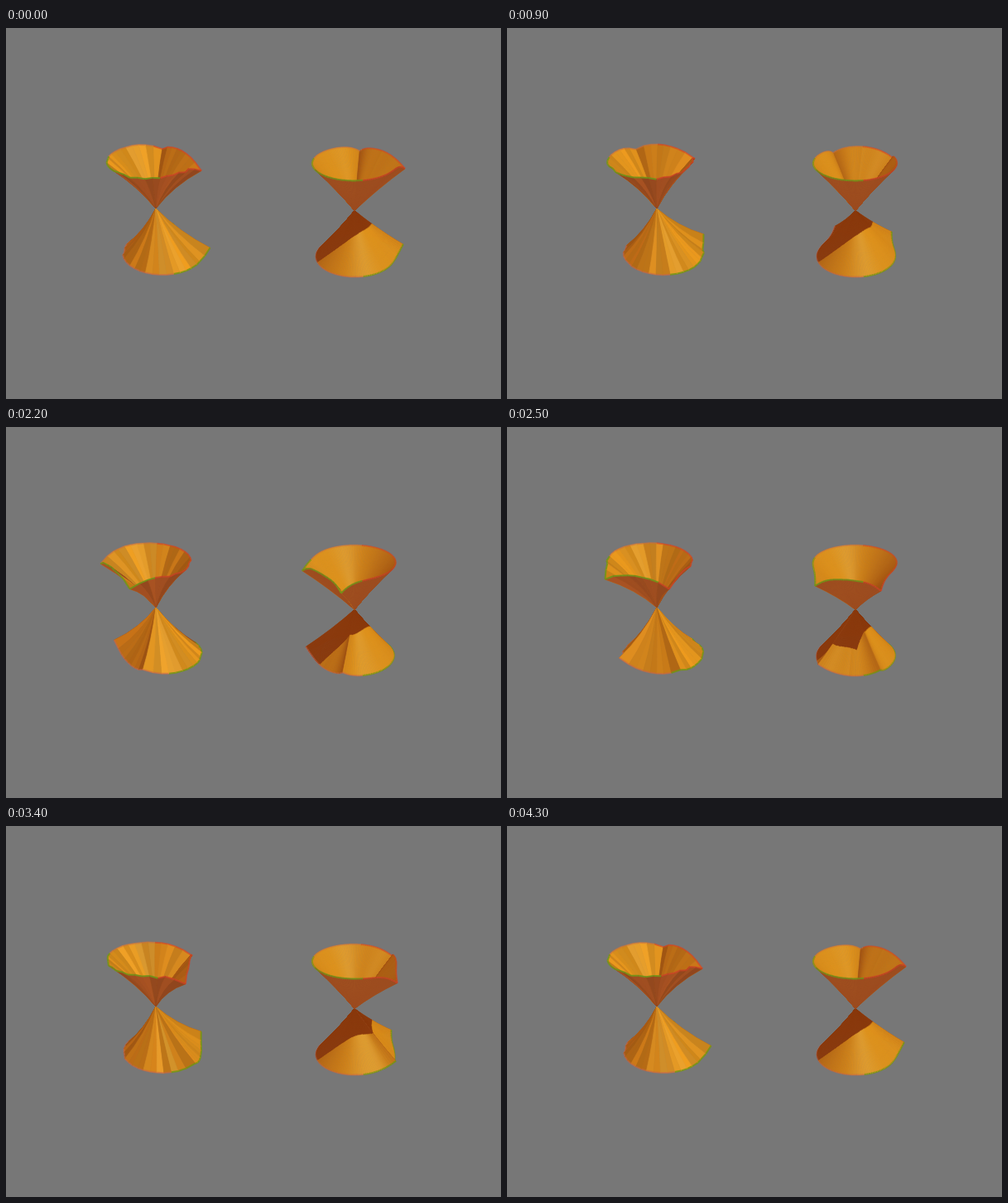
An HTML page with a canvas for the animation above (4.4 s loop, 598 px wide and 448 px high).

```html
<!DOCTYPE html>
<html lang="en">
<head>
<meta charset="utf-8">
<title>Rotating double cones</title>
<style>
  html, body { margin: 0; width: 100%; height: 100%; overflow: hidden; background: #777; }
  canvas { display: block; }
</style>
</head>
<body>
<canvas id="stage" width="598" height="448"></canvas>
<script>
const ctx = document.getElementById('stage').getContext('2d');
const TAU = Math.PI * 2, RAD = Math.PI / 180;
const STEP = 100, STEPS = 44;
const TILT = 28 * RAD, CAMERA = 900;

const dot = (a, b) => a[0] * b[0] + a[1] * b[1] + a[2] * b[2];
const scale = (a, k) => a.map(v => v * k);
const unit = a => scale(a, 1 / (Math.hypot(...a) || 1));
const cross = (a, b) => [
  a[1] * b[2] - a[2] * b[1], a[2] * b[0] - a[0] * b[2], a[0] * b[1] - a[1] * b[0]];

// x points right, y away from the viewer, z up
const light = unit([0.3, -0.25, 1]);
const view = [0, -Math.cos(TILT), Math.sin(TILT)];
const half = unit(light.map((v, i) => v + view[i]));

function seeded(seed) {
  return () => {
    seed = (seed * 16807) % 2147483647;
    return seed / 2147483647;
  };
}

function makeCone(spec) {
  const random = seeded(spec.seed);
  const jitter = Array.from({ length: spec.sides }, () => random() * 2 - 1);
  return { ...spec, jitter };
}

const cones = [
  makeCone({ x: 181, y: 218, radius: 80, sides: 36, tip: 40, turn: -10,
    lean: 0.13, flare: 0.22, rough: 1, seed: 77 }),
  makeCone({ x: 421, y: 220.5, radius: 80, sides: 180, tip: 38, turn: 0,
    lean: 0.01, flare: 0.08, rough: 0, seed: 5 })
];

// Opening angle of the cone: round, with two sharp outward ridges
function opening(cone, angle) {
  const a = Math.abs(Math.atan2(Math.sin(angle), Math.cos(angle))) / RAD;
  return (37.5 + 12 * Math.exp(-Math.abs(a - cone.tip) / 11)) * RAD;
}

function heading(u) {
  return 38.5 + 360 * u - 38 * Math.sin(TAU * u) + 7 * Math.cos(TAU * u);
}

function project(cone, p) {
  const k = cone.radius / (1 - dot(p, view) * cone.radius / CAMERA);
  return [
    cone.x + (p[0] - p[2] * cone.lean) * k,
    cone.y - (p[2] * Math.cos(TILT) + p[1] * Math.sin(TILT)) * k
  ];
}

// Point at distance s along a ruling that flares towards the rim
function along(cone, line, s) {
  const phi = line.phi * (1 - cone.flare * (1 - s));
  const r = s * Math.sin(phi);
  return [r * Math.cos(line.angle), r * Math.sin(line.angle), s * Math.cos(phi) * line.side];
}

// Both edges of a strip between two rulings, as one outline
function strip(cone, p, q, ends) {
  const cuts = [0, 0.25, 0.5, 0.75, 1];
  const edge = (line, [from, to]) => cuts.map(c => along(cone, line, from + (to - from) * c));
  return [...edge(p, ends(p)), ...edge(q, ends(q)).reverse()];
}

// How far down a lower ruling the shadow of the upper cone reaches
function shadowReach(cone, dir, turn) {
  const b = dot(dir, light);
  for (let s = 1; s > 0; s -= 0.006) {
    const t = -b * s + Math.sqrt(b * b * s * s + 1 - s * s);
    const q = dir.map((v, i) => v * s + light[i] * t);
    if (q[2] > 0 && Math.acos(Math.min(1, q[2])) < opening(cone, Math.atan2(q[1], q[0]) - turn)) return s;
  }
  return 0;
}

function shade(normal, shadowed, grain) {
  const diffuse = shadowed ? 0 : Math.max(0, dot(normal, light));
  const gloss = shadowed ? 0 : Math.max(0, dot(normal, half)) ** 30;
  const bounce = normal[2] < 0 ? 18 : 0;
  const mix = (dark, lit, shine) => Math.round(
    (dark + bounce + (lit - dark) * diffuse + shine * gloss) * (1 + grain));
  return `rgb(${mix(138, 236, 12)},${mix(58, 160, 32)},${mix(14, 30, 44)})`;
}

function rulings(cone, turn, side) {
  return cone.jitter.map((j, i) => {
    const a = i * TAU / cone.sides;
    const line = {
      phi: opening(cone, a) + cone.rough * j * RAD,
      angle: a + turn,
      side
    };
    line.dir = along(cone, line, 1);
    line.reach = side < 0 && !cone.rough ? shadowReach(cone, line.dir, turn) : 0;
    return line;
  });
}

function rimTint(p, side) {
  const right = p[0] > 0.12;
  if (side < 0) return right ? 'rgba(110,150,20,.8)' : 'rgba(200,100,80,.5)';
  if (right) return 'rgba(215,65,40,.6)';
  return p[1] < 0.15 ? 'rgba(110,150,25,.85)' : 'rgba(200,110,70,.5)';
}

function addFaces(cone, turn, side, faces) {
  const lines = rulings(cone, turn, side);
  lines.forEach((p, i) => {
    const q = lines[(i + 1) % lines.length];
    let normal = unit(cross(p.dir, q.dir));
    if (dot(normal, view) < 0) normal = scale(normal, -1);
    const middle = p.dir.map((v, k) => (v + q.dir[k]) / 2);
    const depth = dot(middle, view);
    const grain = cone.rough * cone.jitter[(i * 7 + 3) % cone.sides] * 0.08;
    const add = (ends, shadowed) => faces.push({
      depth, points: strip(cone, p, q, ends), color: shade(normal, shadowed, grain)
    });
    if (p.reach || q.reach) add(line => [0, line.reach], true);
    if (p.reach < 1 || q.reach < 1) add(line => [line.reach, 1], false);
    faces.push({ depth: depth + 0.001, points: [p.dir, q.dir], rim: rimTint(middle, side) });
  });
}

function drawCone(cone, u) {
  const turn = (heading(u) + cone.turn) * RAD;
  const faces = [];
  addFaces(cone, turn, -1, faces);
  addFaces(cone, turn, 1, faces);
  faces.sort((a, b) => a.depth - b.depth);
  for (const face of faces) {
    ctx.beginPath();
    face.points.forEach(p => ctx.lineTo(...project(cone, p)));
    if (face.rim) {
      ctx.strokeStyle = face.rim;
      ctx.lineWidth = 2;
    } else {
      ctx.closePath();
      ctx.fillStyle = ctx.strokeStyle = face.color;
      ctx.lineWidth = 0.7;
      ctx.fill();
    }
    ctx.stroke();
  }
}

let shown = -1;
function tick(now) {
  const step = Math.floor(now / STEP) % STEPS;
  if (step !== shown) {
    shown = step;
    ctx.fillStyle = '#777';
    ctx.fillRect(0, 0, 598, 448);
    ctx.lineJoin = 'round';
    cones.forEach(cone => drawCone(cone, step / (STEPS - 1)));
  }
  requestAnimationFrame(tick);
}
tick(0);
</script>
</body>
</html>
```
